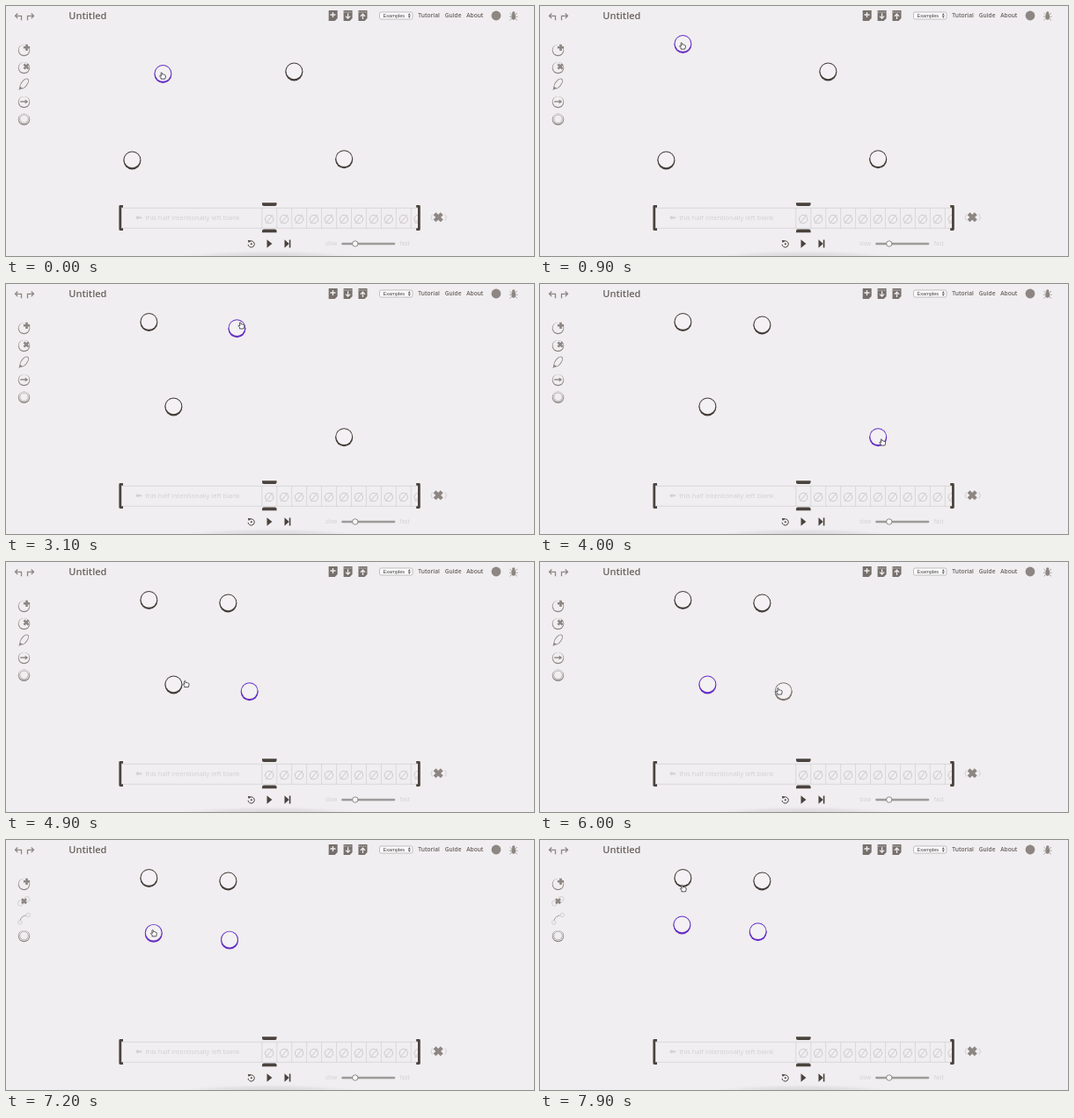
Write an HTML page that moves like this. It is 600 px wide and 285 px high and loops after 8000 ms.

```html
<!DOCTYPE html>
<html lang="en">
<head>
<meta charset="utf-8">
<title>Node editor</title>
<style>
  html, body { margin: 0; width: 100%; height: 100%; overflow: hidden; background: #f0eef0; }
  svg { display: block; width: 100vw; height: 100vh; font-family: "Open Sans", "Noto Sans", sans-serif; }
  .line { fill: none; stroke: currentColor; }
  .solid { fill: currentColor; }
  .dark { color: #4b433e; }
  .mid { color: #8d8682; }
  .pale { color: #d2cfd2; }
</style>
</head>
<body>
<svg viewBox="0 0 600 285">
  <defs>
    <g id="node">
      <circle class="solid" cy="1.1" r="9.9"/>
      <circle class="solid" r="9.9"/>
      <circle cy="-.1" r="8.9" fill="#f3f1f3"/>
    </g>
    <g id="ring">
      <circle class="solid" cy=".6" r="6.7"/>
      <circle cy="-.1" r="6" fill="#f0eef0"/>
    </g>
    <path id="cross" class="line" d="M-3.6 0H3.6M0-3.6V3.6" stroke-width="2.6"/>
    <path id="file" class="solid" d="M-5-6H5V3L2 6H-5Z"/>
    <g id="empty" class="line" stroke-width=".9">
      <circle r="4.7"/>
      <path d="M-4 5 4-5"/>
    </g>
    <path id="undo" class="line" stroke-width="1.3" d="M10.5 11.3H17.5V16.3M13.3 8.5 10.5 11.3 13.3 14.1"/>
    <path id="bracket" class="line" stroke-width="2.8" stroke-linejoin="round" d="M133 228.4H129.8V254.6H133"/>
    <path id="head" class="solid" d="M291 224.2H307.6V226Q307.6 228 305.6 228H293Q291 228 291 226Z"/>
    <radialGradient id="glow">
      <stop offset="0" stop-color="#d6d4d6"/>
      <stop offset=".6" stop-color="#dfdddf" stop-opacity=".7"/>
      <stop offset="1" stop-color="#f0eef0" stop-opacity="0"/>
    </radialGradient>
    <clipPath id="tape"><rect x="130" y="228" width="340" height="28"/></clipPath>
  </defs>

  <rect width="600" height="285" fill="#f0eef0"/>
  <ellipse cx="299" cy="286" rx="112" ry="8" fill="url(#glow)"/>

  <!-- header -->
  <g class="mid">
    <use href="#undo"/>
    <use href="#undo" transform="matrix(-1 0 0 1 42 0)"/>
  </g>
  <text x="71.3" y="15.2" font-size="11" font-weight="600" fill="#6a625e">Untitled</text>
  <g color="#77706c">
    <use href="#file" x="371.7" y="11"/>
    <use href="#file" x="388.6" y="11"/>
    <use href="#file" x="405.5" y="11"/>
    <g fill="none" stroke="#f0eef0" stroke-width="1.3">
      <path d="M368.5 10H374.5M371.5 7V13"/>
      <path d="M388.6 8.3V14M386 11.6 388.6 14.2 391.2 11.6"/>
      <path d="M405.5 15V9.3M402.9 11.7 405.5 9.1 408.1 11.7"/>
      <path d="M384 7H393.2M401 7H410" stroke-width=".7" stroke-dasharray="1.4 .8"/>
    </g>
  </g>
  <rect x="424.5" y="7" width="37.5" height="8" rx="1.8" fill="#fbfafb" stroke="#aaa6a8" stroke-width=".7"/>
  <text x="428.6" y="13" font-size="5.6" fill="#444" style="font-family: 'Liberation Sans', sans-serif">Examples</text>
  <path d="M456.8 10.4 458.3 8.3 459.8 10.4ZM456.8 11.6 458.3 13.7 459.8 11.6Z" fill="#555"/>
  <g font-size="6.6" font-weight="600" fill="#68605c">
    <text x="468.3" y="13.3">Tutorial</text>
    <text x="498.8" y="13.3">Guide</text>
    <text x="523.2" y="13.3">About</text>
  </g>
  <g class="mid">
    <circle class="solid" cx="557" cy="11" r="5.4"/>
    <ellipse class="solid" cx="576.8" cy="12.2" rx="2.3" ry="3.6"/>
    <circle class="solid" cx="576.8" cy="8" r="1.7"/>
    <path class="line" stroke-width=".7" d="M572.5 8 581 16.4M581 8 572.5 16.4M572 12.2H581.6"/>
  </g>

  <!-- side tools -->
  <g class="mid">
    <use href="#ring" x="20.5" y="50"/>
    <use href="#cross" x="23.5" y="47.3"/>
    <g id="singleTools">
      <use href="#ring" x="20.5" y="70"/>
      <use href="#cross" transform="translate(23 69) rotate(45)"/>
      <ellipse class="line" cx="20.8" cy="88.5" rx="6.5" ry="3.2" transform="rotate(-52 20.8 88.5)"/>
      <path class="solid" d="M14.5 96 15.5 92 19 93.5Z"/>
      <use href="#ring" x="20.5" y="109"/>
      <path class="line" d="M16.2 109H23" stroke-width="1.4"/>
      <path class="solid" d="M21.7 106.5 25.2 109 21.7 111.5Z"/>
    </g>
    <g id="multiTools">
      <g class="pale line">
        <circle cx="16.5" cy="72" r="3"/>
        <circle cx="24" cy="67.5" r="3"/>
        <circle cx="15.8" cy="94" r="2.2"/>
        <circle cx="25.3" cy="85.5" r="2.2"/>
      </g>
      <use href="#cross" transform="translate(20.5 69.7) rotate(45)"/>
      <path class="line" d="M16 91.5Q18 86.5 22.5 86" stroke-width=".8"/>
    </g>
    <g id="ringTool">
      <use href="#ring" x="20.5" y="109"/>
      <circle class="line" cx="20.5" cy="109" r="4.8" stroke-width=".6"/>
    </g>
  </g>

  <!-- tape -->
  <g class="pale">
    <path class="line" d="M132 230.3H468M132 253.3H468" stroke-width=".7"/>
    <g id="cells" clip-path="url(#tape)"></g>
    <path class="line" d="M149 241.3H154.3" stroke-width="2"/>
    <path class="solid" d="M147 241.3 150.3 238.8V243.8Z"/>
    <text class="solid" x="158.2" y="244.3" font-size="7.5" font-weight="500">this half intentionally left blank</text>
    <path class="line" d="M484.5 237.5Q481.5 241 484.5 244.5M499 237.5Q502 241 499 244.5"/>
  </g>
  <g class="dark">
    <use href="#bracket"/>
    <use href="#bracket" transform="matrix(-1 0 0 1 599.2 0)"/>
    <use href="#head"/>
    <use href="#head" transform="matrix(1 0 0 -1 0 482.4)"/>
  </g>
  <use href="#cross" class="mid" transform="translate(491.2 240.8) rotate(45) scale(1.6)"/>

  <!-- playback -->
  <g class="dark">
    <path class="line" d="M276.5 268.6A3.6 3.6 0 1 1 275.1 271.8" stroke-width="1"/>
    <path class="solid" d="M274.8 266.9 278.4 267.2 275.8 270Z"/>
    <circle class="solid" cx="278.8" cy="271.3" r="1"/>
    <path class="solid" d="M296.5 266.2 302.4 271 296.5 275.8ZM316.5 266.2 321.7 271 316.5 275.8ZM321.8 266.4H323.4V275.6H321.8Z"/>
  </g>
  <g class="pale" font-size="6.3">
    <text class="solid" x="363" y="273">slow</text>
    <text class="solid" x="447.8" y="273">fast</text>
  </g>
  <rect x="381.5" y="270.2" width="60.5" height="1.7" rx=".8" fill="#a9a5a6" stroke="#77716e" stroke-width=".5"/>
  <circle cx="396.8" cy="271" r="3.2" fill="#f8f7f8" stroke="#77716e" stroke-width=".8"/>

  <g id="nodes"></g>
  <g id="cursor">
    <path transform="scale(.85)" fill="#fff" stroke="#222" stroke-width=".9" stroke-linejoin="round"
      d="M-2.2 4.5V3L-4 .6Q-3.6-1-1.8.6L-2.4-3.4Q-1.4-5-.8-3.6L-.3-1.4Q.6-2.2 1.2-1.2 2.2-1.8 2.7-.7 4-.8 4 .2 4.1 2 3.2 4.5Z"/>
  </g>
</svg>
<script>
  const LOOP = 8000, STEP = 100, MULTI_SELECT = 6100;
  const INK = "#453d39", SELECTED = "#6730c4", FADING = "#81756e";
  const byId = id => document.getElementById(id);

  // Replays the session's gestures up to the given time.
  function sceneAt(time) {
    const a = { x: 178.4, y: 77 }, b = { x: 327.4, y: 74.4 };
    const c = { x: 143.4, y: 175.4 }, d = { x: 384.2, y: 174.2 };
    const cursor = { x: 178, y: 79.3 };
    let selected = [a];

    const progress = (from, to) =>
      Math.sin(Math.min(1, Math.max(0, (time - from) / (to - from))) * Math.PI / 2);
    const drag = (group, from, to, dx, dy) => {
      const k = progress(from, to);
      for (const item of [cursor, ...group]) {
        item.x += dx * k;
        item.y += dy * k;
      }
    };
    const reach = (node, from, to, dx, dy) =>
      drag([], from, to, node.x + dx - cursor.x, node.y + dy - cursor.y);
    const select = (at, ...group) => { if (time >= at) selected = group; };

    drag([a], 500, 900, -16, -34);
    reach(a, 900, 1100, -64, 9);
    reach(a, 1100, 1200, -24, 36);

    reach(c, 1300, 1600, -1, 2);
    select(1600, c);
    drag([c], 1600, 2200, 47, -36);

    reach(b, 2200, 2700, 5, -3);
    select(2700, b);
    drag([b], 2700, 3300, -75, -28);

    reach(d, 3400, 3600, 4, 15);
    reach(d, 3700, 3900, 5, 6);
    select(3900, d);
    drag([d], 4000, 4400, -107.5, -27);

    reach(c, 4600, 5100, -4, -4);
    select(5300, c);
    reach(d, 5300, 5800, -5, 0);
    select(MULTI_SELECT, c, d);
    reach(c, 6200, 6700, .2, .2);
    drag([c, d], 6800, 7500, -29, -43);
    reach(a, 7600, 7900, .4, 12);

    const fading = time === MULTI_SELECT - STEP ? d : null;
    return { nodes: [a, b, c, d], cursor, selected, fading };
  }

  const place = (element, { x, y }) => element.setAttribute("transform", `translate(${x} ${y})`);

  let cells = "";
  for (let x = 299.2; x < 475; x += 16.95) {
    cells += `<path class="line" stroke-width=".7" d="M${x - 8.4} 230V253.5"/>
      <use href="#empty" x="${x}" y="243" color="#c9c5c8"/>`;
  }
  byId("cells").innerHTML = cells;
  byId("nodes").innerHTML = '<use href="#node"/>'.repeat(4);

  function draw(now) {
    const time = Math.floor(now % LOOP / STEP) * STEP;
    const { nodes, cursor, selected, fading } = sceneAt(time);
    nodes.forEach((node, i) => {
      const element = byId("nodes").children[i];
      element.style.color = selected.includes(node) ? SELECTED : node === fading ? FADING : INK;
      place(element, node);
    });
    place(byId("cursor"), cursor);

    const multi = time >= MULTI_SELECT;
    byId("singleTools").style.display = multi ? "none" : "";
    byId("multiTools").style.display = multi ? "" : "none";
    place(byId("ringTool"), { x: 0, y: multi ? 0 : 19.7 });
  }

  const start = performance.now();
  function tick() {
    draw(performance.now() - start);
    requestAnimationFrame(tick);
  }
  tick();
</script>
</body>
</html>
```
